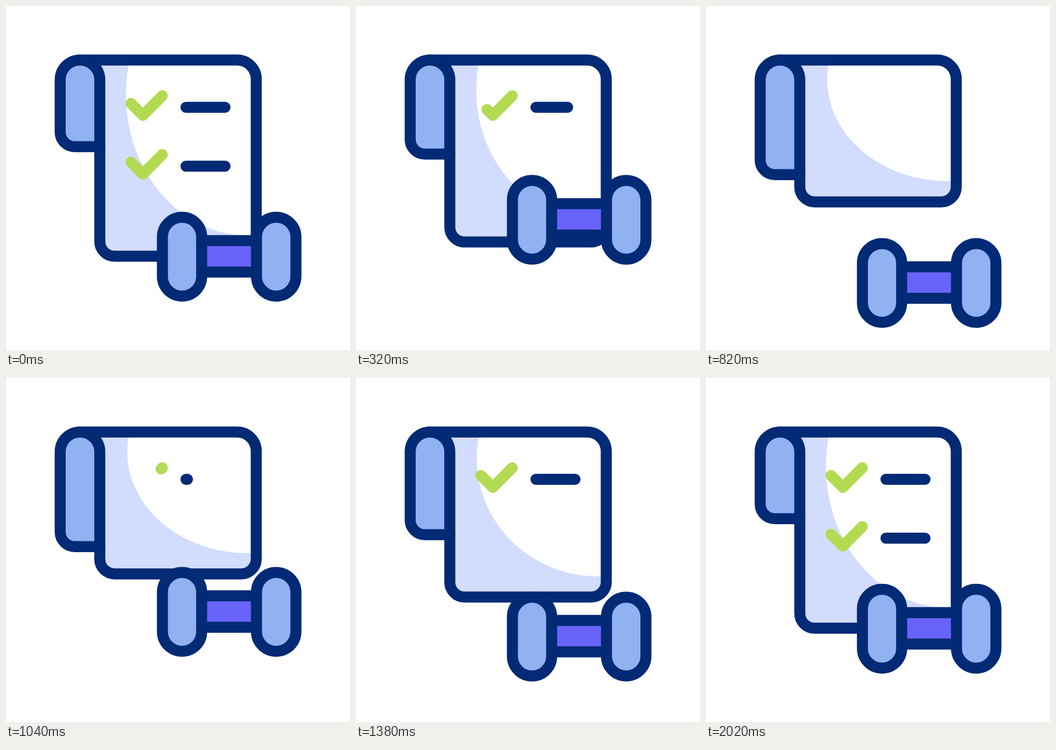
Animation, 640 px wide and 640 px high, one loop 2.4 s. Source, as an HTML page:

```html
<!DOCTYPE html>
<html lang="en">
<head>
<meta charset="utf-8">
<title>Workout plan</title>
<style>
  html, body { margin: 0; width: 100%; height: 100%; overflow: hidden; background: #fff; }
  svg { display: block; width: 100vw; height: 100vh; }
  .ink { stroke: #032a75; stroke-width: 20.5; stroke-linecap: round; stroke-linejoin: round; fill: none; }
  .tick { stroke: #b2db52; }
  .ink.blue, .blue { fill: #92b1f3; }
</style>
</head>
<body>
<svg viewBox="0 0 640 640">
  <clipPath id="clip"><path class="sheet"/></clipPath>
  <path class="sheet" fill="#d2dcfc"/>
  <g clip-path="url(#clip)"><ellipse id="glow" cx="450" fill="#fff"/></g>
  <path id="rollFill" class="blue"/>
  <path class="sheet ink"/>
  <path id="rollEdge" class="ink"/>

  <g class="row">
    <path class="ink tick" pathLength="1" d="M290.8 167 l-36.1 36.4 l-22.2 -22.1"/>
    <path class="ink" pathLength="1" d="M334.8 188.6 h72.7"/>
  </g>

  <g id="dumbbell">
    <rect x="364" y="436.5" width="102" height="58.5" fill="#6863f9"/>
    <rect class="ink blue" x="291" y="393.1" width="73" height="146.6" rx="36.5"/>
    <rect class="ink blue" x="466" y="393.1" width="73.4" height="146.6" rx="36.7"/>
    <path class="ink" d="M364 436.5 h102 m-102 58.5 h102"/>
  </g>
</svg>
<script>
  const LOOP = 2400, STEP = 20, ROW_GAP = 109.4, MAX_FOLD = 101.2;
  const $ = sel => document.querySelector(sel);
  const sheets = document.querySelectorAll('.sheet');
  const firstRow = $('.row');
  const secondRow = firstRow.cloneNode(true);
  secondRow.setAttribute('transform', `translate(0 ${ROW_GAP})`);
  firstRow.after(secondRow);

  // Smooth rise from 0 to 1 between two times
  function ramp(t, from, to) {
    const u = Math.min(1, Math.max(0, (t - from) / (to - from)));
    return u * u * (3 - 2 * u);
  }

  // Turning points of the bouncing dumbbell: time, height
  const turns = [[0, 0], [333, -69], [770, 54], [1140, -50], [1506, 39], [1880, -12], [2020, 0]];
  const bounce = t => turns.slice(1).reduce(
    (y, [end, to], i) => y + (to - turns[i][1]) * ramp(t, turns[i][0], end), 0);

  function setAttrs(el, attrs) {
    for (const name in attrs) el.setAttribute(name, attrs[name]);
  }

  const sheetPath = y =>
    `M137.5 100.5 H430 a35.6 35.6 0 0 1 35.6 35.6 V${y - 28} a28 28 0 0 1 -28 28` +
    ` H202 a27.5 27.5 0 0 1 -27.5 -27.5 V137.3 A37 36.8 0 0 0 137.5 100.5 Z`;

  const rollPath = y =>
    `M174.5 ${y} H128 a27.2 27.2 0 0 1 -27.2 -27.2 V137.3 A36.8 36.8 0 0 1 137.5 100.5`;

  function drawRow(row, amount) {
    row.style.display = amount > 0 ? '' : 'none';
    for (const line of row.children) {
      line.setAttribute('stroke-dasharray', amount < 1 ? `${amount} 3` : 'none');
    }
  }

  function draw(t) {
    const fold = MAX_FOLD * (ramp(t, 177, 602) - ramp(t, 1033, 1803));
    sheets.forEach(el => el.setAttribute('d', sheetPath(465.6 - fold)));

    const roll = rollPath(261.7 + fold * 0.514);
    $('#rollEdge').setAttribute('d', roll);
    $('#rollFill').setAttribute('d', roll + ' A37 36.8 0 0 1 174.5 137.3 Z');

    const cy = 165 - fold * 0.275;
    setAttrs($('#glow'), { cy, rx: 227 - fold * 0.025, ry: 427 - fold - cy });

    drawRow(firstRow, 1 - ramp(t, 225, 565) + ramp(t, 1000, 1340));
    drawRow(secondRow, 1 - ramp(t, 0, 300) + ramp(t, 1382, 1722));
    $('#dumbbell').setAttribute('transform', `translate(0 ${bounce(t)})`);
  }

  const start = performance.now();
  function tick() {
    const t = (performance.now() - start) % LOOP;
    draw(Math.floor(t / STEP) * STEP);
    requestAnimationFrame(tick);
  }
  draw(0);
  requestAnimationFrame(tick);
</script>
</body>
</html>
```
